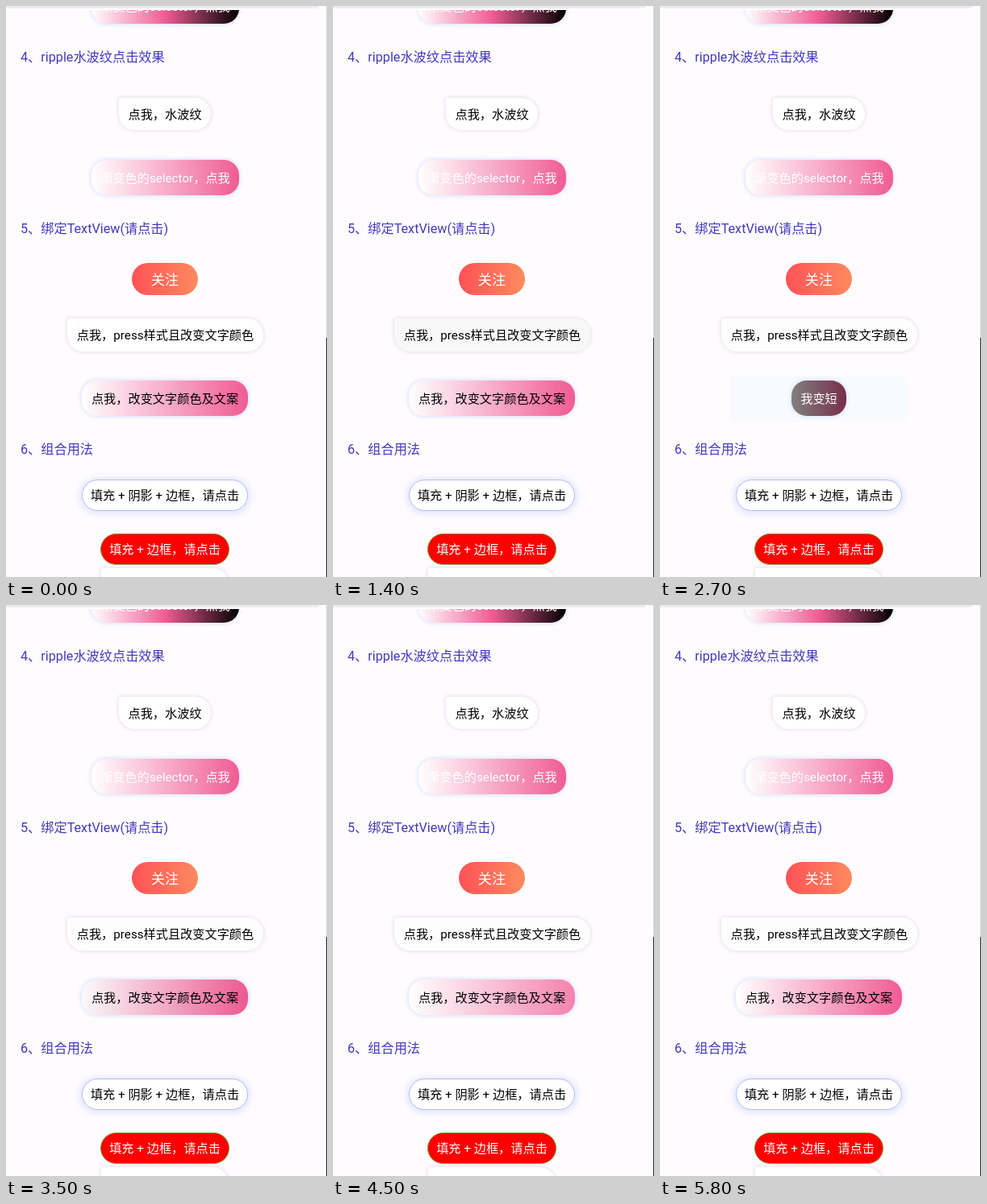
An HTML page for the animation above (6.9 s loop, 398 px wide and 709 px high).

```html
<!DOCTYPE html>
<html lang="zh-CN">
<head>
<meta charset="utf-8">
<style>
html, body { margin: 0; width: 100%; height: 100%; overflow: hidden; background: #fffcff; }
body { position: relative; font: 15.2px Roboto, "Noto Sans CJK SC", "Noto Sans CJK", sans-serif; color: #000; }
div { position: absolute; box-sizing: border-box; white-space: nowrap; text-align: center; }
span { position: relative; top: .5px; }
#view { left: 0; top: 5px; width: 398px; height: 704px; overflow: hidden; }
#page { left: 0; top: -5px; width: 398px; height: 709px; }
.title { left: 18px; font-size: 16.2px; line-height: 24px; color: #4238bf; }
.plain { background: #fff; border-radius: 3px 20px 20px 20px; box-shadow: 0 0 4px 2px #eee8ef; }
.fade { background: linear-gradient(90deg, #fff, #f05c94); border-radius: 19px; box-shadow: 0 0 4px 2px #e3e7ff; }
.light { color: #fff; }
#top { background: linear-gradient(90deg, #fff, #f05c94 50%, #000); }
#follow { border-radius: 20px; font-size: 17.2px; }
#ghost { background: #f9faff; border-radius: 8px; }
#outline { background: #fff; border: 1px solid #b3bdf0; border-radius: 20px; box-shadow: 0 1px 7px 4px #e6e9ff; }
#red { background: #fe0000; border: 1px solid #7c9a35; border-radius: 20px; }
#strip { left: 0; top: 0; width: 388px; height: 3px; background: #f0ebf1; border-radius: 0 0 4px 0; }
#edge { left: 397px; top: 0; width: 1px; height: 709px; background: linear-gradient(#dcd8de 412px, #2c2a2f 412px); }
</style>
</head>
<body>
<div id="view"><div id="page"></div></div>
<div id="strip"></div>
<div id="edge"></div>
<script>
const page = document.getElementById('page');

function add(id, className, text) {
  const el = document.createElement('div');
  const label = document.createElement('span');
  el.id = id;
  el.className = className;
  label.textContent = text;
  el.append(label);
  page.append(el);
  return el;
}

function place(el, x, y, w, h) {
  Object.assign(el.style, { left: x + 'px', top: y + 'px', width: w + 'px', height: h + 'px' });
  const border = el.id === 'outline' || el.id === 'red' ? 2 : 0;
  el.style.lineHeight = h - border + 'px';
  return el;
}

function button(id, className, text, ...box) {
  return place(add(id, className, text), ...box);
}

function title(text, centre) {
  add('', 'title', text).style.top = centre - 12 + 'px';
}

function setText(el, text) {
  if (el.firstChild.textContent !== text) el.firstChild.textContent = text;
}

title('4、ripple水波纹点击效果', 63);
title('5、绑定TextView(请点击)', 276);
title('6、组合用法', 550);

button('top', 'fade light', '渐变色的selector，点我', 106, -22, 183, 44);
button('ripple', 'plain', '点我，水波纹', 140, 114, 114, 40);
button('selector', 'fade light', '渐变色的selector，点我', 106, 191, 183, 44);
const follow = button('follow', 'light', '关注', 156, 319, 82, 40);
const press = button('press', 'plain', '点我，press样式且改变文字颜色', 76, 388, 243, 41);
const ghost = button('ghost', '', '', 86, 458, 221, 58);
const morph = button('morph', 'fade', '', 94, 465, 206, 44);
button('outline', '', '填充 + 阴影 + 边框，请点击', 94, 588, 206, 39);
button('red', 'light', '填充 + 边框，请点击', 117, 655, 160, 39);
button('bottom', 'plain', '', 118, 698, 158, 40);

const within = (t, from, to) => t >= from && t < to;

// Tint over the third button: dark fade after release, then a light pulse.
function tint(t) {
  if (within(t, 2400, 3200)) return 'rgba(0,0,0,.5)';
  if (within(t, 3200, 3800)) return `rgba(0,0,0,${.3 * .4 ** ((t - 3200) / 100)})`;
  if (within(t, 4300, 4700)) return `rgba(255,255,255,${.25 * Math.sin(Math.PI * (t - 4200) / 500)})`;
  return 'transparent';
}

function draw(now) {
  const t = Math.floor(now % 6900 / 100) * 100;

  const pressed = within(t, 1000, 1400) || within(t, 1800, 2100);
  const easing = [900, 1400, 1700, 2100].includes(t);
  press.style.background = pressed ? '#f0f0f0' : easing ? '#f8f8f8' : t >= 1500 ? '#fdfdfd' : '#fff';
  press.style.color = pressed ? '#ff5252' : '#000';

  const short = within(t, 2400, 3200);
  const overlay = tint(t);
  place(morph, short ? 163 : 94, 465, short ? 68 : 206, 44);
  setText(morph, short ? '我变短' : '点我，改变文字颜色及文案');
  morph.style.color = short ? '#fff' : '#000';
  morph.style.backgroundImage =
    `linear-gradient(${overlay}, ${overlay}), linear-gradient(90deg, #fff, #f05c94)`;
  ghost.style.visibility = short ? 'visible' : 'hidden';

  const followed = within(t, 4900, 5800);
  setText(follow, followed ? '已关注' : '关注');
  follow.style.background = followed ? '#ccc' : 'linear-gradient(90deg, #ff5257, #ff8a5e)';
}

function loop() {
  draw(performance.now());
  requestAnimationFrame(loop);
}
loop();
</script>
</body>
</html>
```
